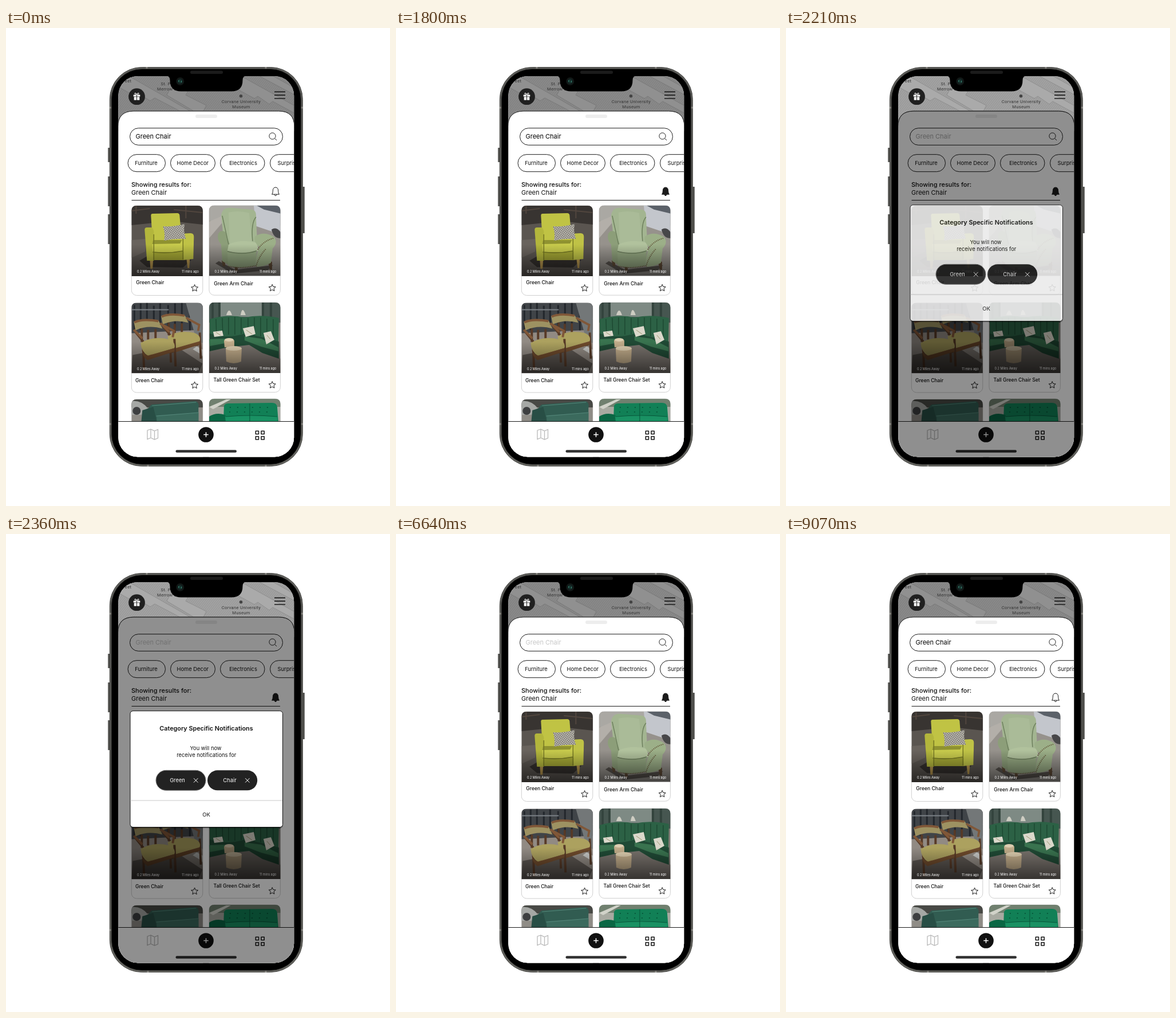
Recreate the animation shown at these times as an HTML page. Size 671 by 834 pixels, loop 9.23 s.

```html
<!DOCTYPE html>
<html lang="en">
<head>
<meta charset="utf-8">
<title>Green chair alerts</title>
<style>
html, body { margin: 0; width: 100%; height: 100%; overflow: hidden; background: #fff; }
svg { display: block; }
text { font-family: Inter, "Open Sans", sans-serif; font-size: 9.35px; fill: #111; }
.big { font-size: 11px; }
.mid { text-anchor: middle; }
.name { font-size: 8.6px; font-weight: 500; }
.tiny { font-size: 5.5px; fill: #fff; }
.place { font-family: Roboto, sans-serif; font-size: 7.5px; letter-spacing: .35px; fill: #333; }
.line { fill: none; stroke: #1b1b1b; }
</style>
</head>
<body>
<svg width="671" height="834" viewBox="0 0 671 834">
<defs>
  <clipPath id="screen"><rect x="196.300" y="84" width="306.900" height="664.300" rx="34"/></clipPath>
  <clipPath id="photo"><path d="M0 123V9Q0 0 9 0H115.500Q124.500 0 124.500 9V123Z"/></clipPath>
  <linearGradient id="fade" x2="0" y2="1">
    <stop offset=".55" stop-opacity="0"/><stop offset="1" stop-opacity=".55"/>
  </linearGradient>
  <linearGradient id="metal" x2="0" y2="1">
    <stop stop-color="#60605d"/><stop offset=".5" stop-color="#4c4c49"/><stop offset="1" stop-color="#676762"/>
  </linearGradient>
  <pattern id="hatch" width="3" height="3" patternUnits="userSpaceOnUse" patternTransform="rotate(-52)">
    <path d="M0 1H3" stroke="#8d8d8d" stroke-width=".6"/>
  </pattern>
  <pattern id="dots" width="3" height="3" patternUnits="userSpaceOnUse" patternTransform="rotate(35)">
    <rect width="3" height="3" fill="#c9c6bd"/><circle cx="1.500" cy="1.500" r="1" fill="#4b4845"/>
  </pattern>
  <path id="star" d="M0-6L1.700-2L6-1.600L2.800 1.300L3.700 5.500L0 3.300L-3.700 5.500L-2.800 1.300L-6-1.600L-1.700-2Z" fill="none" stroke="#1b1b1b" stroke-linejoin="round"/>
  <path id="cross" d="M-3.700-3.700L3.700 3.700M3.700-3.700L-3.700 3.700" stroke="#fff"/>

  <g id="lime">
    <rect width="125" height="123" fill="#5a5550"/>
    <path d="M0 0H125V33L70 27L0 34Z" fill="#383431"/>
    <path d="M0 9L32 5M8 0V14M95 0V22M74 7L124 12" stroke="#51463e" stroke-width="2"/>
    <path d="M0 60L25 58L24 80L0 91Z" fill="#69635d"/>
    <path d="M14 96L31 86L105 94L90 108L27 107Z" fill="#34302d"/>
    <path d="M32 92H38L37 110H33ZM96 92H102L101 109H98Z" fill="#b5954d"/>
    <path d="M34 17Q34 14 37 14L80 13Q83 13 84 16L88 65L37 66Z" fill="#c0c344"/>
    <path d="M23 42Q23 38 27 38L35 38Q40 41 39 52L39 96L27 96Z" fill="#b3b63c"/>
    <path d="M86 49L103 48Q109 48 109 54L108 93L90 95Z" fill="#bfc246"/>
    <path d="M38 80H91V95L38 95Z" fill="#a3a634"/>
    <path d="M36 66Q36 62 41 62L87 61Q92 62 91 67L90 79Q65 83 37 81Z" fill="#c7ca4c"/>
    <path d="M36 67L85 66L88 60L38 60Z" fill="#8f9230"/>
    <path d="M37 81Q65 84 90 79M39 50V95M90 52V94" fill="none" stroke="#747722" stroke-width="1.500"/>
    <path d="M55 36Q75 37 93 32Q90 43 95 58Q76 57 57 61Q59 47 55 36Z" fill="url(#dots)"/>
  </g>

  <g id="sage">
    <rect width="125" height="123" fill="#96928c"/>
    <path d="M0 0H125V35L78 20L0 27Z" fill="#aaa8a3"/>
    <path d="M78 0H125V54L112 46L82 36Z" fill="#c3c6cc"/>
    <path d="M83 0H125V14L96 7Z" fill="#5b6169"/>
    <path d="M109 42Q118 36 125 47V57Q113 58 109 42Z" fill="#474749"/>
    <path d="M0 28L23 18V30L0 57Z" fill="#b3afa9"/>
    <path d="M17 97L45 112L112 104L102 113L42 119L11 101Z" fill="#57524d"/>
    <path d="M22 96H28V106H24ZM44 106H50V115H46ZM103 98H110V112H106Z" fill="#5e4935"/>
    <path d="M21 17Q23 3 38 4L74 7Q83 8 82 20L84 64L32 76L25 55Z" fill="#a3b591"/>
    <path d="M34 12Q52 8 70 13L75 64L36 70Z" fill="#aabb98"/>
    <path d="M16 49Q20 42 28 46L36 68L33 103L23 97L21 68Q13 59 16 49Z" fill="#8c9e79"/>
    <path d="M34 68Q55 58 84 65L86 79Q63 88 32 79Z" fill="#b1c29d"/>
    <path d="M32 80Q60 87 83 79L81 105Q55 111 33 105Z" fill="#92a57f"/>
    <path d="M80 54Q95 44 112 54Q122 63 111 75L108 100Q96 107 82 107Q79 94 88 73Q77 63 80 54Z" fill="#9caf88"/>
    <path d="M85 77Q94 62 113 57M82 106Q87 89 99 76M33 106Q57 111 81 105" fill="none" stroke="#675d3f" stroke-width="2" stroke-dasharray="1.500 1.500"/>
    <path d="M23 18L34 68M82 20Q73 30 76 62M32 80Q60 87 83 79" fill="none" stroke="#6d7f5d" stroke-width="1.500"/>
  </g>

  <g id="oak">
    <rect width="125" height="123" fill="#918a83"/>
    <path d="M0 0H125V47L0 53Z" fill="#404448"/>
    <path d="M5 4V48M16 1V48M27 0V41M39 5V42M50 1V40M64 4V40M76 1V43M88 0V42M102 2V48" stroke="#23272c" stroke-width="3"/>
    <path d="M0 12H65M65 27H125" stroke="#7a8085" stroke-width="2"/>
    <path d="M95 0H125V70L114 67Z" fill="#737778"/>
    <path d="M2 91L78 76L124 106L117 123H0Z" fill="#5b5550"/>
    <path d="M107 81L120 89L125 94V82L114 76Z" fill="#c8c9c6"/>
    <use href="#oakChair" transform="translate(48 -8) scale(.95)"/>
    <g id="oakChair">
      <path d="M7 51L20 67L22 118M75 63L77 111M22 91L73 85M18 45V68M29 47V64M42 46V63" fill="none" stroke="#573a27" stroke-width="4"/>
      <path d="M4 33Q19 25 48 32L54 45Q29 38 7 48Z" fill="#9d9262"/>
      <path d="M5 34Q19 27 47 32M4 47Q11 54 19 62M50 36Q66 45 74 49L72 60" fill="none" stroke="#805738" stroke-width="4"/>
      <path d="M16 70Q39 57 66 64Q78 69 75 79L29 93Q17 85 16 70Z" fill="#aca15f"/>
      <path d="M18 81Q21 91 29 92L75 79V85L28 100Q19 95 18 81Z" fill="#6e4a2c"/>
    </g>
  </g>

  <g id="round">
    <rect width="125" height="123" fill="#837d77"/>
    <path d="M0 0H125V35H0Z" fill="#465650"/>
    <path d="M18 0H95V25H18Z" fill="#7e8a84"/>
    <path d="M18 0V28M94 0V28M6 0V29M108 0V28" stroke="#33433d" stroke-width="4"/>
    <path d="M30 22Q35 6 40 22M55 22Q58 4 64 22" fill="#cdccc2"/>
    <path d="M0 84L34 78L70 74L125 98V123H0Z" fill="#78726c"/>
    <path d="M1 29Q32 20 62 26Q91 20 122 27L121 70Q115 78 96 75L76 65L34 68L1 72Z" fill="#2c6145"/>
    <path d="M1 54Q31 64 63 54Q94 60 122 68V98L93 88L70 74L33 78L1 85Z" fill="#204a35"/>
    <path d="M0 64L30 63L33 70L1 76ZM62 59L91 63L121 78V85L91 77L62 66Z" fill="#39734f"/>
    <path d="M12 29L13 60M23 27L24 58M34 26V56M45 25V56M56 27V55M68 27V54M79 26V57M90 26V59M101 28V63M112 29V66" stroke="#1b452f" stroke-width="1.300"/>
    <path d="M7 51L23 49L25 58L9 60ZM59 45L78 41L81 55L64 60ZM95 53L108 50L114 65L100 73Z" fill="#dbd8cb"/>
    <path d="M65 48L75 55M101 57L107 64M12 52L20 57" stroke="#9b9a72"/>
    <path d="M26 66Q35 60 44 66V78H27ZM29 80Q43 73 57 80L56 103Q43 109 30 103Z" fill="#c2ad8b"/>
    <ellipse cx="35" cy="65" rx="8" ry="3" fill="#dccdb0"/>
    <ellipse cx="43" cy="80" rx="14" ry="4" fill="#dfcfb0"/>
  </g>

  <g id="teal">
    <rect width="125" height="123" fill="#8f8c86"/>
    <path d="M0 0H125V14H0Z" fill="#484945"/>
    <path d="M0 3Q17 1 28 15L17 27H0Z" fill="#a6a8a5"/>
    <circle cx="9" cy="20" r="7" fill="#3e3f40"/>
    <path d="M35 9L111 3Q119 4 117 15V40H20L25 20Z" fill="#315c51"/>
    <path d="M19 19L38 13L45 40H17Z" fill="#284e45"/>
    <path d="M44 28L117 23V40H44Z" fill="#3b6a5d"/>
    <path d="M36 11L113 5M43 29L117 23" stroke="#55877a" fill="none"/>
  </g>

  <g id="emerald">
    <rect width="125" height="123" fill="#a8aaa1"/>
    <path d="M0 0H125V14H0Z" fill="#70806f"/>
    <path d="M0 14L30 1H38L7 18Z" fill="#d1d2c9"/>
    <path d="M26 13Q27 8 34 8L110 7Q118 7 119 14L121 40H25Z" fill="#118056"/>
    <path d="M0 31Q12 23 28 28L32 40H0Z" fill="#0a6744"/>
    <path d="M28 31Q70 26 119 31V40H29Z" fill="#199163"/>
    <path d="M71 8V40M29 31Q73 27 119 31" fill="none" stroke="#07563a"/>
    <path d="M36 15H112M35 23H113" stroke="#075b3c" stroke-width="2" stroke-dasharray="2 11"/>
  </g>
</defs>

<!-- phone body -->
<path d="M179.500 209V234M179.500 259V311M179.500 325V377M520.500 277V358" stroke="#686865" stroke-width="3"/>
<path d="M180.700 209V234M180.700 259V311M180.700 325V377M519.300 277V358" stroke="#2b2b29"/>
<rect x="181.300" y="68.500" width="337" height="696" rx="56" fill="url(#metal)" stroke="#454542"/>
<path d="M181 139H185M515 139H519M181 691H185M515 691H519M246 68V72M454 761V765M248 761V765M454 68V72" stroke="#85847f" stroke-width="3"/>
<rect x="184.500" y="71.700" width="330.700" height="689.600" rx="53" stroke="#252523"/>

<g clip-path="url(#screen)">
  <rect x="196" y="84" width="308" height="665" fill="#fff"/>
  <!-- map strip -->
  <path d="M196 84H504V180H196Z" fill="#b9b9b9"/>
  <path d="M196 84H504V180H196Z" fill="url(#hatch)"/>
  <g fill="#bdbdbd" stroke="#989898" stroke-width=".8">
    <path d="M197 88L215 84L322 145H304L260 122L252 127L230 114L222 117L197 103Z"/>
    <path d="M290 100L318 111L314 117L350 135L345 145H328L281 117Z"/>
    <path d="M411 84L503 135V148L466 128L460 133L440 119L434 123L401 105Z"/>
    <path d="M443 84L503 116V104L467 84Z"/>
  </g>
  <rect id="shade" x="196" y="84" width="308" height="96"/>
  <text class="place" x="205" y="94.500">reet</text>
  <text class="place" x="270.500" y="100">St. P</text>
  <text class="place" x="264" y="109">Merrow e</text>
  <circle cx="410.500" cy="118.700" r="2.800" fill="#444"/>
  <text class="place mid" x="411" y="131">Corvane University</text>
  <text class="place mid" x="411" y="140">Museum</text>
  <circle cx="228.500" cy="119.700" r="14.400" fill="#202020"/>
  <path d="M222.700 116.500H234.300V119.500H222.700ZM223.700 120.300H233.300V125.700H223.700Z" fill="#fff"/>
  <path d="M228.500 116V126" stroke="#202020"/>
  <path d="M228.500 116Q224 116 225 113.700Q227 112.500 228.500 116Q230 112.500 232 113.700Q233 116 228.500 116" fill="none" stroke="#fff"/>
  <path d="M469 111.300H488M469 117.200H488M469 123H488" class="line" stroke-width="1.700"/>

  <!-- sheet -->
  <path id="sheet" d="M195.700 760V172Q195.700 145 223 145H476.500Q503.800 145 503.800 172V760Z" fill="#fff" stroke="#111"/>
  <rect x="331" y="151" width="38" height="6" rx="3" fill="#ededed"/>
  <g class="line">
    <rect x="216.500" y="174.700" width="267" height="29.600" rx="14.800"/>
    <circle cx="465.500" cy="188.500" r="5.600"/>
    <path d="M469.500 192.500L473 196M219.500 300.500H479"/>
    <rect x="213" y="220.700" width="65.500" height="30" rx="15"/>
    <rect x="287.500" y="220.700" width="78" height="30" rx="15"/>
    <rect x="374.500" y="220.700" width="77.500" height="30" rx="15"/>
    <rect x="461.500" y="220.700" width="72" height="30" rx="15"/>
  </g>
  <text id="query" class="big" x="226.500" y="192.700">Green Chair</text>
  <text class="mid" x="245" y="239">Furniture</text>
  <text class="mid" x="326.300" y="239">Home Decor</text>
  <text class="mid" x="414.500" y="239">Electronics</text>
  <text x="474.500" y="239">Surprise</text>
  <text class="big" x="219" y="277" font-weight="500">Showing results for:</text>
  <text class="big" x="219" y="291">Green Chair</text>
  <path id="bell" d="M464.600 290.200Q466.300 288.500 466.300 284.500Q466.300 278 471 278T475.700 284.500Q475.700 288.500 477.400 290.200ZM468.800 290.600Q471 294.800 473.200 290.600" stroke="#1b1b1b" stroke-linejoin="round"/>
  <g id="cards"></g>

  <!-- tab bar -->
  <path d="M195 686.500H505V760H195Z" fill="#fff" stroke="#1b1b1b"/>
  <path d="M247 702L253 700L259.500 703L265.500 700.500V715.500L259.500 718L253 715L247 717.500ZM253 700V715M259.500 703V718" fill="none" stroke="#b9b9b9" stroke-width="1.300"/>
  <circle cx="349.500" cy="709.500" r="13.300" fill="#111"/>
  <path d="M345.300 709.500H353.700M349.500 705.300V713.700" stroke="#fff" stroke-width="1.500"/>
  <path d="M436.300 703.300H441.500V708.500H436.300ZM446 703.300H451.200V708.500H446ZM436.300 712.800H441.500V718H436.300ZM446 712.800H451.200V718H446Z" class="line" stroke-width="1.600" stroke-linejoin="round"/>
  <rect x="296.500" y="736.300" width="106.500" height="4.400" rx="2.200" fill="#303030"/>
  <use id="dim" href="#sheet" style="filter:brightness(0)" opacity=".44"/>

  <!-- dialog -->
  <g id="dialog">
    <rect x="217" y="310" width="267" height="203.500" rx="5" opacity=".3"/>
    <rect x="217" y="308.700" width="266.500" height="202.800" rx="5" fill="#fff" stroke="#111"/>
    <text class="mid" x="350" y="343.300" style="font-size:10.8px;font-weight:600">Category Specific Notifications</text>
    <text class="mid" x="349" y="377">You will now</text>
    <text class="mid" x="350.300" y="388.700">receive notifications for</text>
    <rect x="262" y="412.300" width="87" height="35" rx="17.500" fill="#222" stroke="#777"/>
    <rect x="352" y="412.300" width="87.200" height="35" rx="17.500" fill="#222"/>
    <text class="mid" x="299.500" y="433" style="fill:#fff">Green</text>
    <text class="mid" x="391" y="433" style="fill:#fff">Chair</text>
    <use href="#cross" x="331.700" y="429.900"/>
    <use href="#cross" x="421.800" y="429.900"/>
    <path d="M217.500 465H483" stroke="#c9c9c9"/>
    <text class="mid" x="350" y="492.700">OK</text>
  </g>
</g>

<!-- notch -->
<path d="M280 83Q286.500 84 286.500 91Q286.500 110.500 306 110.500H394Q413.500 110.500 413.500 91Q413.500 84 420 83Z"/>
<rect x="322" y="74.500" width="57" height="5.500" rx="2.500" fill="#1b1b1b"/>
<circle cx="304.300" cy="93" r="7" fill="#111716"/>
<circle cx="304.300" cy="93" r="4.300" fill="#142b29"/>
<path d="M302 91V94M306.300 92V95" stroke="#3c8a75" stroke-width="1.200"/>
</svg>

<script>
const $ = id => document.getElementById(id);
const LOOP = 9230;

const card = (x, y, photo, name, nameX, nameY) => `
  <rect x="${x}" y="${y}" width="124.500" height="156.500" rx="9" fill="#fff" stroke="#cfcfcf"/>
  <g transform="translate(${x} ${y})" clip-path="url(#photo)">
    <use href="#${photo}"/>
    ${name ? '<rect width="125" height="123" fill="url(#fade)"/>' : ''}
  </g>
  ${name ? `<text class="tiny" x="${x + 9.7}" y="${y + 117}">0.2 Miles Away</text>
  <text class="tiny" x="${x + 117.5}" y="${y + 117}" text-anchor="end">11 mins ago</text>
  <text class="name" x="${nameX}" y="${nameY}">${name}</text>
  <use href="#star" x="${x + 110.3}" y="${y + 143.6}"/>` : ''}`;

$('cards').innerHTML =
  card(219.3, 310, 'lime', 'Green Chair', 227.3, 447) +
  card(354.9, 309.7, 'sage', 'Green Arm Chair', 363.3, 448.7) +
  card(219.3, 479.5, 'oak', 'Green Chair', 226, 617.7) +
  card(354.9, 479, 'round', 'Tall Green Chair Set', 362.5, 617) +
  card(219.3, 648, 'teal') +
  card(354.9, 647, 'emerald');

const ramp = (t, a, b) => Math.min(1, Math.max(0, (t - a) / (b - a)));
const easeOut = p => 1 - (1 - p) ** 2;

function draw(now) {
  const t = now % LOOP;
  const open = t >= 2040 && t < 6640;
  const rise = t < 2040 ? 0 : easeOut(ramp(t, 2000, 2360));
  const grey = 200 * (t < 6640 ? rise : 1 - easeOut(ramp(t, 6640, 6940)));
  const bell = t < 5000 ? ramp(t, 1400, 1650) : 1 - ramp(t, 8740, 9070);

  $('query').style.fill = `rgb(${grey},${grey},${grey})`;
  $('bell').setAttribute('fill', `rgba(27,27,27,${bell})`);
  $('shade').setAttribute('opacity', open ? .1 : .24);
  $('dim').style.display = open ? '' : 'none';
  $('dialog').setAttribute('opacity', open ? rise : 0);
  requestAnimationFrame(draw);
}
requestAnimationFrame(draw);
</script>
</body>
</html>
```
